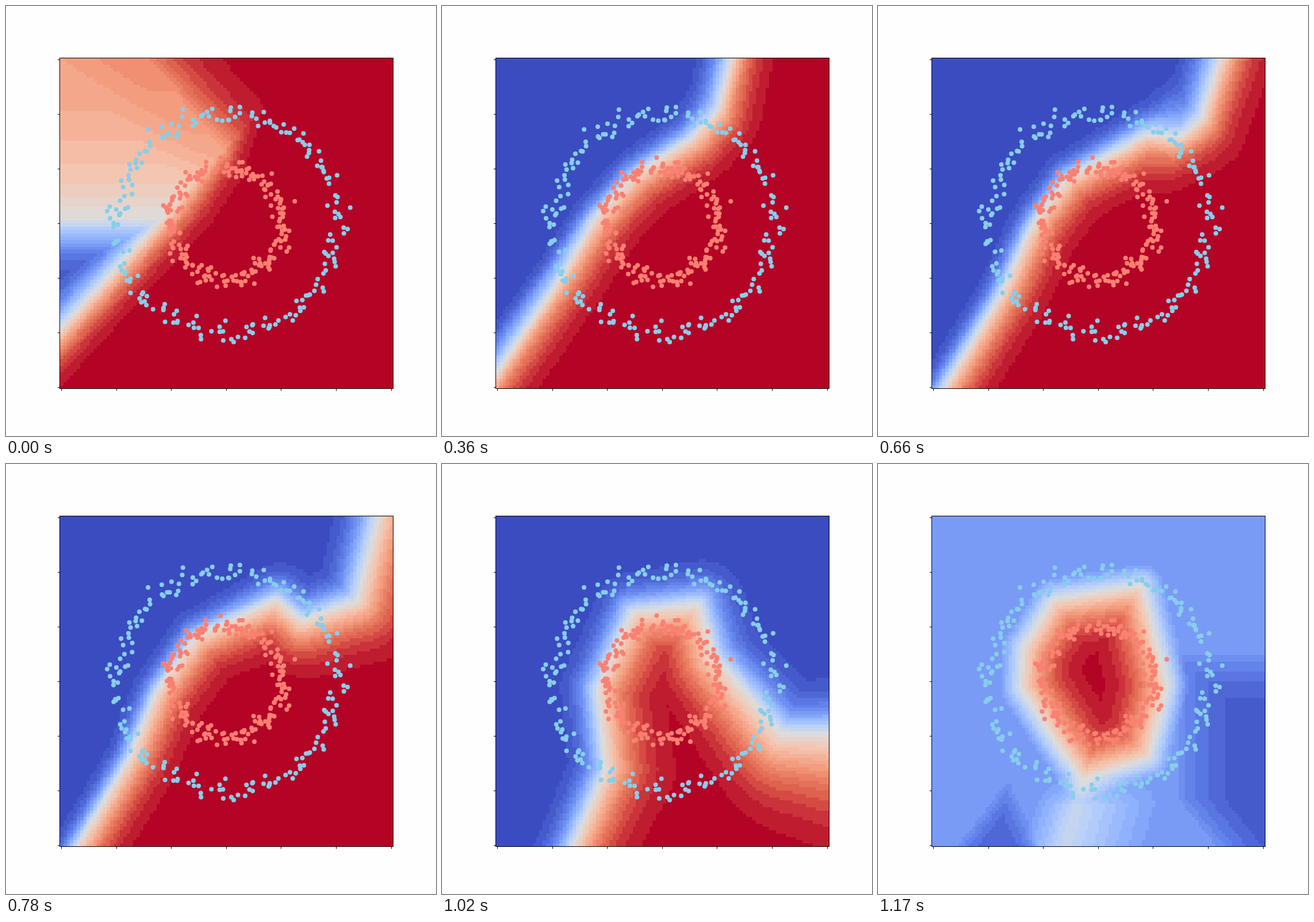
An HTML page with a canvas for the animation above (1200 ms loop, 748x748 px).

```html
<!DOCTYPE html>
<html lang="en">
<head>
<meta charset="utf-8">
<title>Decision boundary</title>
<style>
html, body { margin: 0; width: 100%; height: 100%; overflow: hidden; background: #fefefe; }
canvas { display: block; width: 748px; height: 748px; }
</style>
</head>
<body>
<canvas id="stage" width="748" height="748"></canvas>
<script>
const ctx = document.getElementById('stage').getContext('2d');
const LOOP = 1200, STEP = 30, N = 100, LEVELS = 32, FULL = 3.4;
const BOX = { x: 94, y: 90.5, w: 579.5, h: 575.5 };
const CENTER = { x: 384, y: 378 };
const clamp = (v, lo, hi) => Math.max(lo, Math.min(hi, v));
const lerp = (a, b, t) => a + (b - a) * t;

// Diverging blue-white-red map, cut into flat bands.
const STOPS = [
  [59, 76, 192], [98, 130, 234], [141, 176, 254], [184, 208, 249], [221, 221, 221],
  [245, 196, 173], [244, 154, 123], [222, 96, 77], [180, 4, 38]
];
const BANDS = Array.from({ length: LEVELS }, (_, i) => {
  const p = i / (LEVELS - 1) * (STOPS.length - 1);
  const k = Math.min(STOPS.length - 2, Math.floor(p));
  return STOPS[k].map((c, j) => Math.round(lerp(c, STOPS[k + 1][j], p - k)));
});

function inside(poly, x, y) {
  let hit = false;
  for (let i = 0, j = poly.length - 1; i < poly.length; j = i++) {
    const [ax, ay] = poly[i], [bx, by] = poly[j];
    if ((ay > y) !== (by > y) && x < (bx - ax) * (y - ay) / (by - ay) + ax) hit = !hit;
  }
  return hit;
}

function distance(path, x, y) {
  let best = Infinity;
  for (let i = 1; i < path.length; i++) {
    const [ax, ay] = path[i - 1], dx = path[i][0] - ax, dy = path[i][1] - ay;
    const s = clamp(((x - ax) * dx + (y - ay) * dy) / (dx * dx + dy * dy), 0, 1);
    best = Math.min(best, Math.hypot(x - ax - s * dx, y - ay - s * dy));
  }
  return best;
}

// Logit field around a path; each side's ramp width grows from left to right.
function boundary(path, blue, red, closed) {
  const line = closed ? [...path, path[0]] : path;
  const poly = closed ? path : [...path, [900, -50], [900, 900], [40, 900]];
  return (x, y) => {
    const isRed = inside(poly, x, y);
    const [left, right] = isRed ? red : blue;
    const u = FULL * distance(line, x, y) / lerp(left, right, ((x - BOX.x) / BOX.w) ** 2);
    return isRed ? Math.min(u, 12) : Math.max(-u, -8);
  };
}

const keys = [];
function addKey(time, floor, field, extra = () => 0) {
  const raw = new Float32Array(N * N), add = new Float32Array(N * N);
  for (let i = 0; i < N * N; i++) {
    const x = BOX.x + (i % N + 0.5) * BOX.w / N;
    const y = BOX.y + (Math.floor(i / N) + 0.5) * BOX.h / N;
    raw[i] = field(x, y);
    add[i] = extra(x, y);
  }
  keys.push({ time, floor, raw, add });
}

// Opening state: a gentle slope from blue to orange, cut by two steep planes.
function opening(x, y) {
  const slope = y > 370
    ? (370 - y) / 32
    : 1.1 * (1 - Math.exp((y - 370) / 150)) + clamp((x - y) / 400, 0, 0.25);
  const lower = FULL * ((x - 378) * 0.738 + (y - 252) * 0.676) / 68;
  const upper = 2.1 * ((x - 245) * 0.775 - (y - 90) * 0.634) / 93;
  return Math.max(slope, lower) + Math.max(0, Math.min(slope, lower)) + Math.max(0, upper);
}

// Closing state: darker and lighter wedges around the closed region.
function wedges(x, y) {
  const right = clamp(Math.min((x - 515 - Math.max(0, y - 580) * 0.8) / 130, (y - 325) / 125), 0, 1);
  const left = clamp(Math.min(x - 228 + (y - 545) * 0.78, 228 + (y - 545) * 0.45 - x) / 48, 0, 1);
  const off = x - 355 + (y - 560) * 0.3;
  const middle = Math.max(0, 1 - Math.abs(off) / (off < 0 ? 75 : 150)) * clamp((y - 545) / 50, 0, 1);
  return 1.1 * middle - 2 * right - 1.1 * left;
}

addKey(0, -3.6, opening);
addKey(210, -2.5, boundary(
  [[40, 652], [94, 580], [250, 376], [340, 290], [430, 232], [455, 190], [463, 40]],
  [35, 100], [88, 75]));
addKey(540, -5, boundary(
  [[70, 716], [225, 470], [275, 365], [330, 297], [495, 190], [550, 60]],
  [42, 55], [78, 84]));
addKey(780, -5, boundary(
  [[90, 722], [215, 510], [262, 395], [330, 300], [470, 235], [515, 272], [610, 238], [658, 50]],
  [40, 90], [80, 115]));
addKey(900, -5, boundary(
  [[130, 722], [225, 540], [262, 400], [325, 287], [450, 250], [500, 328], [600, 378], [730, 345]],
  [50, 110], [88, 130]));
addKey(1020, -3.5, boundary(
  [[205, 720], [285, 530], [270, 390], [330, 257], [447, 243], [475, 335], [590, 468], [740, 470]],
  [62, 95], [85, 205]));
addKey(1170, -1.38, boundary(
  [[305, 235], [460, 210], [504, 385], [472, 512], [355, 550], [310, 487], [248, 390], [252, 320]],
  [90, 95], [104, 104], true), wedges);

let seed = 7;
function random() {
  seed = (seed * 1664525 + 1013904223) % 4294967296;
  return (seed + 1) / 4294967297;
}
const gauss = () => Math.sqrt(-2 * Math.log(random())) * Math.cos(2 * Math.PI * random());
const ring = (count, radius, noise) => Array.from({ length: count }, (_, i) => {
  const a = i / count * 2 * Math.PI;
  return [
    CENTER.x + radius * Math.cos(a) + noise * gauss(),
    CENTER.y + radius * Math.sin(a) + noise * gauss()
  ];
});
const outer = ring(200, 191, 8.5);
const inner = ring(200, 95.5, 8.5);

function drawDots(points, color) {
  ctx.fillStyle = color;
  for (const [x, y] of points) {
    ctx.beginPath();
    ctx.arc(x, y, 4, 0, 2 * Math.PI);
    ctx.fill();
  }
}

const map = document.createElement('canvas');
map.width = map.height = N;
const mapCtx = map.getContext('2d');
const image = mapCtx.createImageData(N, N);

function drawField(time) {
  let k = 0;
  while (k < keys.length - 2 && time >= keys[k + 1].time) k++;
  const a = keys[k], b = keys[k + 1];
  const t = clamp((time - a.time) / (b.time - a.time), 0, 1);
  const floor = lerp(a.floor, b.floor, t);
  for (let i = 0; i < N * N; i++) {
    const u = Math.max(lerp(a.raw[i], b.raw[i], t), floor) + lerp(a.add[i], b.add[i], t);
    const level = Math.min(LEVELS - 1, Math.floor(LEVELS / (1 + Math.exp(-u))));
    image.data.set([...BANDS[level], 255], 4 * i);
  }
  mapCtx.putImageData(image, 0, 0);
  ctx.imageSmoothingEnabled = false;
  ctx.drawImage(map, BOX.x, BOX.y, BOX.w, BOX.h);
}

function drawAxes() {
  ctx.strokeStyle = '#000';
  ctx.lineWidth = 1;
  ctx.strokeRect(93.5, 90.5, 580, 575);
  ctx.beginPath();
  for (let i = 0; i < 7; i++) {
    const x = Math.floor(96.5 + i * 95.6) + 0.5, y = 93.5 + i * 95;
    ctx.moveTo(x, 666);
    ctx.lineTo(x, 669.5);
    ctx.moveTo(90, y);
    ctx.lineTo(93.5, y);
  }
  ctx.stroke();
}

function draw(time) {
  ctx.fillStyle = '#fefefe';
  ctx.fillRect(0, 0, 748, 748);
  drawField(time);
  drawDots(outer, '#87ceeb');
  drawDots(inner, '#fa8072');
  drawAxes();
}

let shown = -1;
const start = performance.now();
function tick() {
  const elapsed = Math.max(0, performance.now() - start) % LOOP;
  const time = Math.floor(elapsed / STEP) * STEP;
  if (time !== shown) draw(shown = time);
  requestAnimationFrame(tick);
}
tick();
</script>
</body>
</html>
```
